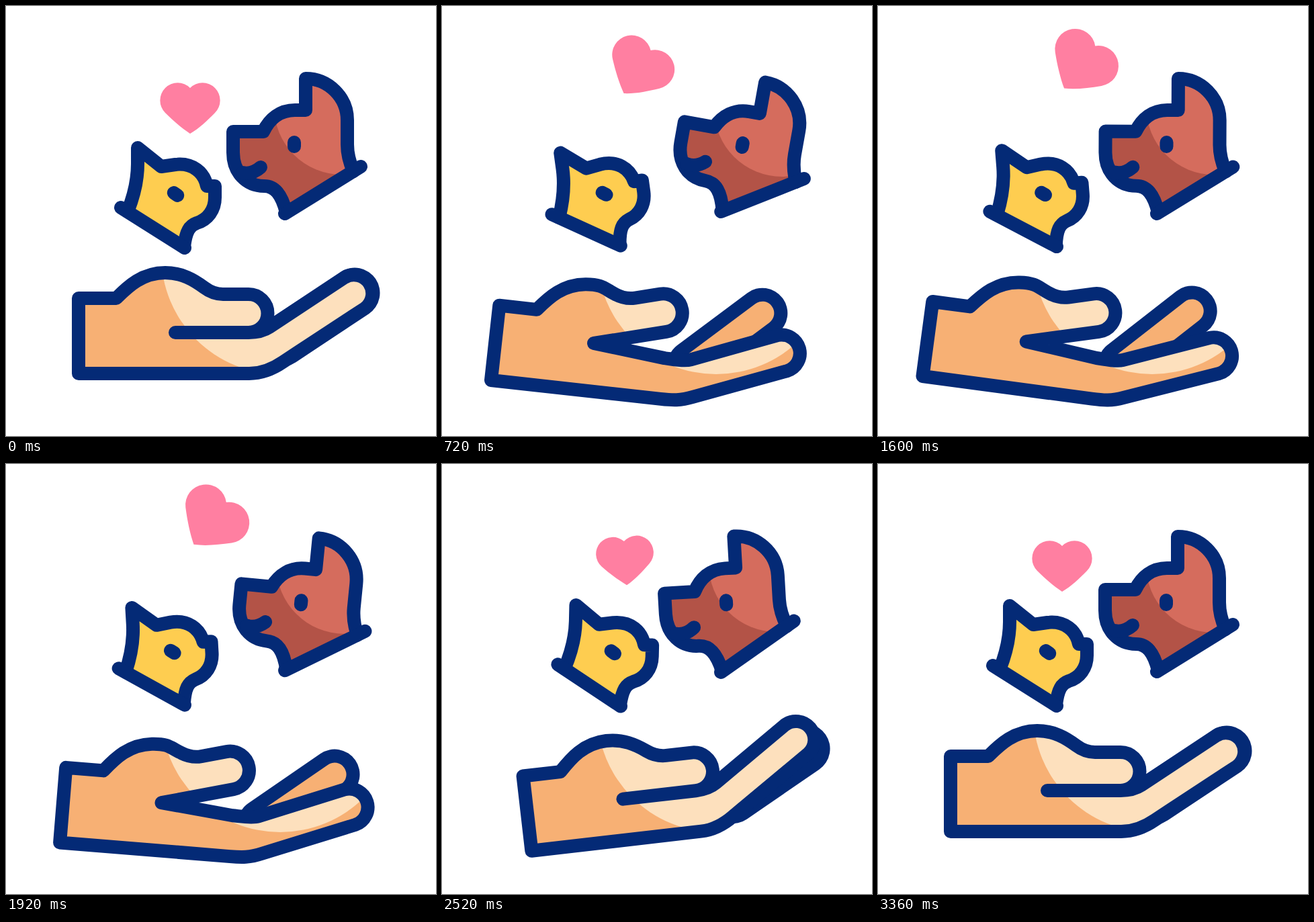
An HTML page that plays this animation: 640 by 640 pixels, repeating every 3600 ms.

```html
<!DOCTYPE html>
<html lang="en">
<head>
<meta charset="utf-8">
<title>Pet care</title>
<style>
  html, body { margin: 0; width: 100%; height: 100%; overflow: hidden; background: #fff; }
  svg { display: block; width: 100vw; height: 100vh; }
  .line { fill: none; stroke: #042a76; stroke-width: 20; stroke-linecap: round; stroke-linejoin: round; }
</style>
</head>
<body>
<svg viewBox="0 0 640 640">
  <defs>
    <path id="dogBody" d="M417 307 C410 280 400 268 384 268 C358 268 338 248 338 218 V187 H383 C392 168 408 155 430 155 H446 V108 C480 108 508 136 508 170 V206 C508 220 511 232 517 246"/>
    <path id="catBody" d="M181 306 C191 281 196 258 196 235 V211 L231 239 L252 236 C278 233 295 248 299 268 H311 V285 C311 304 300 318 284 323 C273 327 268 335 265 358"/>
    <clipPath id="dogClip"><use class="dogTurn" href="#dogBody"/></clipPath>
    <clipPath id="handClip"><path class="hand"/></clipPath>
  </defs>

  <path id="heart" fill="#ff7fa1" d="M0 50 C-12 42 -25 31 -37 19 A26 26 0 1 1 0 -18 A26 26 0 1 1 37 19 C25 31 14 42 0 50 Z"/>

  <use class="dogTurn" href="#dogBody" fill="#b35347"/>
  <g clip-path="url(#dogClip)"><circle id="dogLight" r="101" fill="#d56c5d"/></g>
  <g class="dogTurn line">
    <use href="#dogBody"/>
    <path d="M415 309 L528 239 M379 240 C370 248 361 250 352 248 M429 203 V209"/>
  </g>

  <g id="cat">
    <use href="#catBody" fill="#fecd50"/>
    <g class="line">
      <use href="#catBody"/>
      <path d="M171 300 L266 360"/>
      <path id="catEye"/>
    </g>
  </g>

  <path class="back line" style="stroke-width:75"/>
  <path class="back line" style="stroke-width:35;stroke:#f7b074"/>
  <path class="hand" fill="#f7b074"/>
  <circle cx="408" cy="371" r="177" fill="#fde0bd" clip-path="url(#handClip)"/>
  <path class="hand line"/>
</svg>
<script>
const LOOP = 3600;
const set = (s, name, value) =>
  document.querySelectorAll(s).forEach(e => e.setAttribute(name, value));

const ramp = (t, a, b) => Math.max(0, Math.min(1, (t - a) / (b - a)));
const ease = (t, a, b) => (1 - Math.cos(Math.PI * ramp(t, a, b))) / 2;

// Dying swing shared by both heads: turning points in time and angle.
const turns = [0, 560, 1210, 1715, 2295, 2770, 3240];
const angles = [0, 10.3, -7.2, 6.2, -4, 1.8, 0];
const swing = t => turns.slice(1).reduce((sum, end, i) =>
  sum + (angles[i + 1] - angles[i]) * ease(t, turns[i], end), 0);

// Returns a function that turns points about (px, py) and prints them.
function turner(px, py, deg) {
  const a = deg * Math.PI / 180, c = Math.cos(a), s = Math.sin(a);
  return (...xy) => {
    let out = '';
    for (let i = 0; i < xy.length; i += 2) {
      const x = xy[i] - px, y = xy[i + 1] - py;
      out += ` ${(px + x * c - y * s).toFixed(2)} ${(py + x * s + y * c).toFixed(2)}`;
    }
    return out;
  };
}

// Hand outline, with the wrist's lower corner as the origin.
function handPath(open) {
  const mound = turner(56, -112, -6 * open);
  const thumb = turner(106, -74, -15.3 * open);
  const finger = turner(259, -26, 11.5 * open);
  return 'M0 0 V-112 H56 C' + mound(74, -130, 95, -150, 129, -150)
    + 'C' + mound(154, -150) + thumb(172, -139, 187, -128)
    + 'C' + thumb(195, -122, 203, -118, 215, -118)
    + 'L' + thumb(253, -118)
    + 'A28.5 28.5 0 0 1' + thumb(253, -61)
    + 'L' + thumb(144, -61)
    + 'L253 -61 C264 -61' + finger(275, -63, 284, -69)
    + 'L' + finger(396, -143)
    + 'A27.5 27.5 0 0 1' + finger(426, -97)
    + 'L' + finger(304, -17)
    + 'C' + finger(288, -6) + ' 272 0 254 0 Z';
}

function drawHand(t) {
  const down = ease(t, 0, 720), drift = ease(t, 720, 1260);
  const lift = ease(t, 1707, 2429);
  const x = 108 - 35 * down - 7 * ease(t, 1100, 1700) + 70 * lift - 28 * ease(t, 2430, 2890);
  const y = 547 + 10 * ease(t, 0, 600) - 6 * drift
    + 37 * ease(t, 1700, 2260) - 41 * ease(t, 2300, 2900);
  const tilt = 6.3 * down + 1.3 * drift - 14.6 * lift + 7 * ease(t, 2430, 3000);
  const open = down - ease(t, 1900, 2430);
  const spread = -21 * down - 2.5 * drift + 29.5 * ease(t, 1760, 2280) - 6 * ease(t, 2400, 3240);
  const back = turner(259, -8, 11.5 * open + spread);

  const place = `translate(${x} ${y}) rotate(${tilt})`;
  set('.hand', 'd', handPath(open));
  set('.hand', 'transform', place);
  set('.back', 'd', 'M' + back(302.6, -48, 411, -120));
  set('.back', 'transform', place);
}

function drawHeart(t) {
  const rise = ease(t, 0, 720), drift = ramp(t, 720, 2000);
  const fall = ease(t, 1950, 2780), settle = ease(t, 2760, 3360);
  const x = 274 + 26 * rise + 16 * drift - 44 * ease(t, 1950, 2400) + 2 * settle;
  const y = 140 - 57 * rise - 10 * drift + 82 * ease(t, 2100, 2750) - 15 * settle;
  const angle = 32 * rise + 6 * drift - 53.5 * fall + 15.5 * settle;
  const scale = 1 + .11 * rise + .06 * drift - .27 * fall + .1 * settle;
  set('#heart', 'transform', `translate(${x} ${y}) rotate(${angle}) scale(${scale})`);
}

function drawHeads(t) {
  const dog = swing(t - 120);
  set('.dogTurn', 'transform', `rotate(${dog} 432 309)`);
  set('#dogLight', 'transform', `translate(${500 + .6 * dog} ${150 + .3 * dog})`);
  set('#cat', 'transform', `rotate(${-swing(t)} 242 360)`);

  const eye = Math.max(.01, ramp(Math.abs(t - 2780), 0, 100));
  set('#catEye', 'd', `M${252.5 - 2.7 * eye} ${280 - 1.9 * eye} l${5.4 * eye} ${3.8 * eye}`);
}

const start = performance.now();
function tick() {
  const t = (performance.now() - start) % LOOP;
  drawHand(t);
  drawHeart(t);
  drawHeads(t);
  requestAnimationFrame(tick);
}
tick();
</script>
</body>
</html>
```
